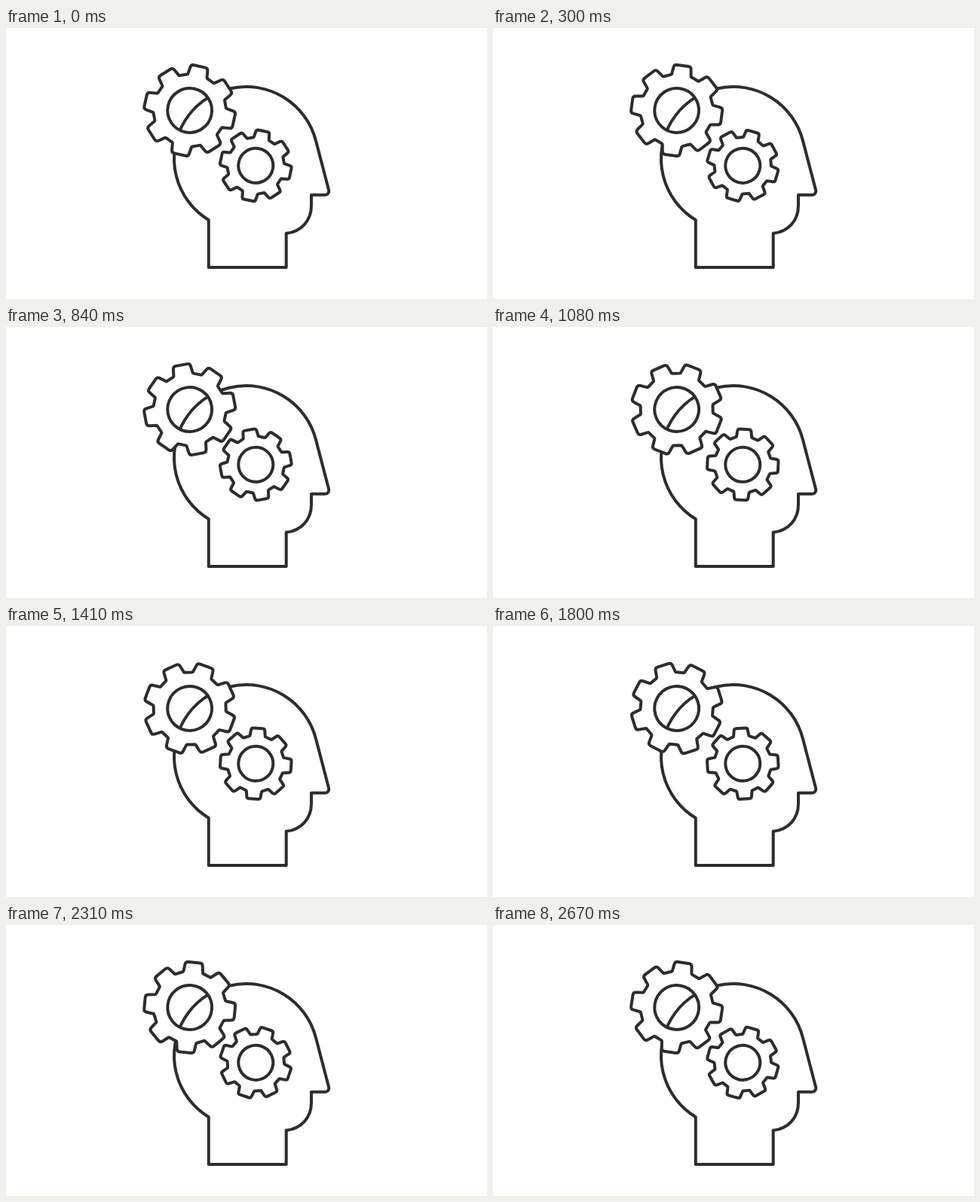
An HTML page with a canvas that plays this animation: 638x360 px, repeating every 2.7 s.

```html
<!DOCTYPE html>
<html lang="en">
<head>
<meta charset="utf-8">
<title>Thinking gears</title>
<style>
  html, body { margin: 0; width: 100%; height: 100%; overflow: hidden; background: #fff; }
  canvas { display: block; }
</style>
</head>
<body>
<canvas id="stage" width="638" height="360"></canvas>
<script>
const ctx = document.getElementById('stage').getContext('2d');
const LOOP = 2700;
const STEP = 30;
const TEETH = 8;
const RAD = Math.PI / 180;

function headPath() {
  const cx = 318.5, cy = 173.5, r = 95.5;
  const path = new Path2D();
  path.moveTo(371.7, 318);
  path.lineTo(268.8, 318);
  path.lineTo(268.8, 255);
  path.arc(cx, cy, r, Math.atan2(81.5, -49.7), -13.9 * RAD);
  path.arcTo(429.8, 221.7, 405, 221.7, 5);
  path.lineTo(405, 221.7);
  path.lineTo(405, 236);
  path.bezierCurveTo(405, 256, 391.5, 270.5, 371.7, 272.8);
  path.closePath();
  return path;
}

// Trapezoid teeth with rounded tips, described for a gear of tip radius 60.
function gearPath(scale) {
  const tooth = [
    [-13, -46.5, 1.5], [-11.2, -60, 4], [11.2, -60, 4], [13, -46.5, 1.5]
  ];
  const points = [];
  for (let i = 0; i < TEETH; i++) {
    const a = i * 2 * Math.PI / TEETH, c = Math.cos(a), s = Math.sin(a);
    for (const [x, y, r] of tooth) {
      points.push([(x * c - y * s) * scale, (x * s + y * c) * scale, r * scale]);
    }
  }
  const path = new Path2D();
  const last = points[points.length - 1];
  path.moveTo((last[0] + points[0][0]) / 2, (last[1] + points[0][1]) / 2);
  points.forEach(([x, y, r], i) => {
    const next = points[(i + 1) % points.length];
    path.arcTo(x, y, (x + next[0]) / 2, (y + next[1]) / 2, r);
  });
  path.closePath();
  const hole = 29.4 * scale;
  path.moveTo(hole, 0);
  path.arc(0, 0, hole, 0, 2 * Math.PI);
  return path;
}

const head = headPath();
const gears = [
  { x: 243.7, y: 109.5, phase: 12.5, dir: 1, path: gearPath(1) },
  { x: 331.3, y: 182.8, phase: 11.7, dir: -1, path: gearPath(0.783) }
];

function drawGear({ x, y, phase, dir, path }, progress) {
  ctx.save();
  ctx.translate(x, y);
  ctx.rotate((phase + dir * 360 * progress) * RAD);
  ctx.fill(path, 'evenodd');
  ctx.stroke(path);
  ctx.restore();
}

function draw(now) {
  const progress = Math.floor((now % LOOP) / STEP) * STEP / LOOP;
  ctx.fillStyle = '#fff';
  ctx.fillRect(0, 0, 638, 360);
  ctx.strokeStyle = '#2d2d2d';
  ctx.lineWidth = 4;
  ctx.lineJoin = 'round';
  ctx.stroke(head);
  for (const gear of gears) drawGear(gear, progress);
}

const start = performance.now();
function tick() {
  draw(performance.now() - start);
  requestAnimationFrame(tick);
}
tick();
</script>
</body>
</html>
```
